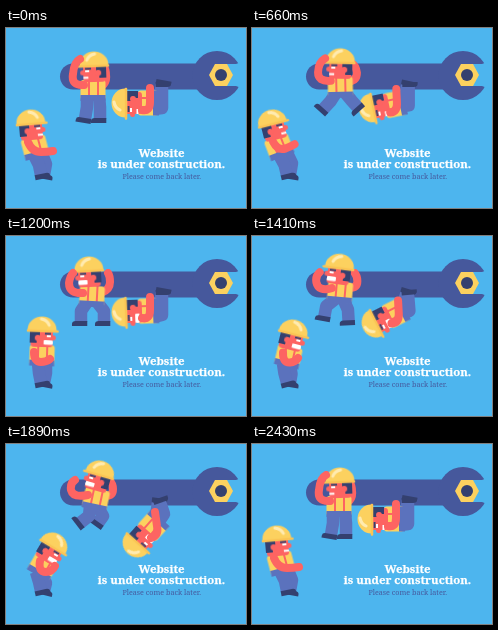
These frames come from a looping animation (240 by 180 pixels, 2.7 s). An HTML page:

```html
<!DOCTYPE html>
<html lang="en">
<head>
<meta charset="utf-8">
<title>Under construction</title>
<style>
html, body { margin: 0; width: 100%; height: 100%; overflow: hidden; background: #4db5ee; }
svg { display: block; width: 100%; height: 100%; }
text { font-family: "Noto Serif", serif; text-anchor: middle; }
.title { font-size: 11.4px; font-weight: 700; fill: #fff; stroke: #fff; stroke-width: .25px; }
.note { font-size: 7.2px; fill: #46589c; }
.leg, .arm { fill: none; stroke-linejoin: round; }
.leg { stroke: #5b72bd; stroke-width: 12.5; marker-end: url(#boot-left); }
.right .leg { marker-end: url(#boot-right); }
.arm { stroke: #fd6462; stroke-width: 8; stroke-linecap: round; }
.move { animation: 2.7s cubic-bezier(.4, 0, .6, 1) infinite; }

/* Hanging worker: two pull-ups */
@keyframes a-head {
  0%, 90%, 100% { transform: translate(88px, 39px) rotate(-2deg); }
  16.67% { transform: translate(88px, 34px) rotate(0deg); }
  35.56% { transform: translate(89px, 39px) rotate(3deg); animation-timing-function: ease-in; }
  44.44% { transform: translate(83px, 36px) rotate(-3deg); animation-timing-function: ease-out; }
  60% { transform: translate(89px, 32px) rotate(12deg); }
  70% { transform: translate(93px, 32px) rotate(16deg); }
}
@keyframes a-body {
  0%, 90%, 100% { transform: translate(87px, 62px); }
  16.67% { transform: translate(88px, 57px) rotate(-2deg); }
  35.56% { transform: translate(89px, 62px); animation-timing-function: ease-in; }
  44.44% { transform: translate(86px, 60px) rotate(3deg); animation-timing-function: ease-out; }
  60% { transform: translate(89px, 54px) rotate(6deg); }
  70% { transform: translate(90px, 55px) rotate(12deg); }
}
@keyframes a-left {
  0%, 90%, 100% { d: path("M81 68L81 79L79 91"); }
  16.67% { d: path("M84 64L76 70L65 76"); }
  35.56% { d: path("M83 68L83 79L82 91"); animation-timing-function: ease-in; }
  44.44% { d: path("M81 66L75 75L75 86"); animation-timing-function: ease-out; }
  60% { d: path("M85 61L74 68L71 79"); }
  70% { d: path("M84 62L83 72L74 79"); }
}
@keyframes a-right {
  0%, 90%, 100% { d: path("M93 68L94 79L94 91"); }
  16.67% { d: path("M93 64L101 69L110 73"); }
  35.56% { d: path("M95 68L97 79L98 91"); animation-timing-function: ease-in; }
  44.44% { d: path("M91 66L98 75L98 86"); animation-timing-function: ease-out; }
  60% { d: path("M91 61L95 73L96 85"); }
  70% { d: path("M92 63L97 72L92 79"); }
}
@keyframes a-near {
  0%, 90%, 100% { d: path("M78 57Q65 58 67 46Q68 34 74 31"); }
  16.67% { d: path("M78 51Q65 52 65 43Q65 34 72 30"); }
  35.56% { d: path("M80 56Q67 57 68 46Q69 35 75 31"); animation-timing-function: ease-in; }
  44.44% { d: path("M77 57Q63 58 63 47Q64 40 67 37"); animation-timing-function: ease-out; }
  60% { d: path("M81 50Q68 55 65 46Q63 40 68 36"); }
  70% { d: path("M82 51Q67 54 65 46Q64 39 69 36"); }
}
@keyframes a-far {
  0%, 90%, 100% { d: path("M96 58Q101 54 100 47Q100 42 98 39"); }
  16.67% { d: path("M97 51Q106 51 106 43Q105 35 100 33"); }
  35.56% { d: path("M97 58Q103 55 103 48Q102 42 99 39"); animation-timing-function: ease-in; }
  44.44% { d: path("M95 57Q104 54 104 46Q104 40 102 37"); animation-timing-function: ease-out; }
  60% { d: path("M98 50Q106 51 106 45Q106 40 103 37"); }
  70% { d: path("M99 52Q107 52 107 45Q107 40 104 37"); }
}

/* Swinging worker: hooked on the handle */
@keyframes b-head {
  0%, 90%, 100% { transform: translate(121px, 75px) rotate(-90deg); }
  16.67% { transform: translate(123px, 82px) rotate(-108deg); }
  35.56% { transform: translate(121px, 75px) rotate(-90deg); animation-timing-function: ease-in; }
  44.44% { transform: translate(121px, 76px) rotate(-92deg); animation-timing-function: ease-out; }
  60% { transform: translate(127px, 91px) rotate(-128deg); }
  70% { transform: translate(132px, 98px) rotate(-138deg); }
}
@keyframes b-body {
  0%, 90%, 100% { transform: translate(142px, 75px) rotate(-90deg); }
  16.67% { transform: translate(143px, 77px) rotate(-108deg); }
  35.56% { transform: translate(142px, 75px) rotate(-90deg); animation-timing-function: ease-in; }
  44.44% { transform: translate(142px, 75px) rotate(-92deg); animation-timing-function: ease-out; }
  60% { transform: translate(144px, 78px) rotate(-128deg); }
  70% { transform: translate(147px, 82px) rotate(-138deg); }
}
@keyframes b-left {
  0%, 90%, 100% { d: path("M148 81L156 80L156 58"); }
  16.67% { d: path("M151 77L157 76L157 58"); }
  35.56% { d: path("M148 81L156 80L156 58"); animation-timing-function: ease-in; }
  44.44% { d: path("M148 81L156 79L156 58"); animation-timing-function: ease-out; }
  60% { d: path("M152 76L158 73L156 58"); }
  70% { d: path("M154 76L158 70L154 58"); }
}
@keyframes b-right {
  0%, 90%, 100% { d: path("M148 70L154 67L156 56"); }
  16.67% { d: path("M148 69L153 65L155 57"); }
  35.56% { d: path("M148 70L154 67L156 56"); animation-timing-function: ease-in; }
  44.44% { d: path("M148 70L154 67L156 56"); animation-timing-function: ease-out; }
  60% { d: path("M148 70L151 65L154 57"); }
  70% { d: path("M150 72L151 66L152 58"); }
}
@keyframes b-arm {
  0%, 90%, 100% { d: path("M136 82Q144 84 144 74L144 60"); }
  16.67% { d: path("M140 86Q147 84 146 74L145 61"); }
  35.56% { d: path("M135 82Q143 84 143 74L143 61"); animation-timing-function: ease-in; }
  44.44% { d: path("M136 82Q144 84 144 74L144 61"); animation-timing-function: ease-out; }
  60% { d: path("M141 90Q149 88 148 78L147 66"); }
  70% { d: path("M145 94Q153 91 151 82L149 68"); }
}

/* Standing worker: leans back, then forward, feet planted */
@keyframes c-head {
  0%, 21%, 80%, 100% { transform: translate(25px, 97px) rotate(-5deg); }
  28.89% { transform: translate(15px, 97px) rotate(-28deg); }
  35.56% { transform: translate(20px, 96px) rotate(-22deg); }
  44.44% { transform: translate(36px, 96px) rotate(2deg); }
  60% { transform: translate(45px, 102px) rotate(26deg); }
  70% { transform: translate(46px, 104px) rotate(31deg); }
}
@keyframes c-body {
  0%, 21%, 80%, 100% { transform: translate(29px, 119px) rotate(-15deg); }
  28.89% { transform: translate(24px, 118px) rotate(-30deg); }
  35.56% { transform: translate(28px, 118px) rotate(-26deg); }
  44.44% { transform: translate(36px, 119px) rotate(2deg); }
  60% { transform: translate(37px, 121px) rotate(24deg); }
  70% { transform: translate(37px, 122px) rotate(30deg); }
}
@keyframes c-left {
  0%, 21%, 80%, 100% { d: path("M28 127L33 137L35 147"); }
  28.89% { d: path("M26 127L32 137L35 147"); }
  35.56% { d: path("M29 127L34 137L35 147"); }
  44.44% { d: path("M32 127L33 137L35 147"); }
  60% { d: path("M30 128L32 138L35 147"); }
  70% { d: path("M30 128L33 138L35 147"); }
}
@keyframes c-right {
  0%, 21%, 80%, 100% { d: path("M36 126L40 136L38 147"); }
  28.89% { d: path("M34 124L40 134L38 147"); }
  35.56% { d: path("M37 125L41 135L38 147"); }
  44.44% { d: path("M40 127L40 137L38 147"); }
  60% { d: path("M36 130L39 139L38 147"); }
  70% { d: path("M36 131L40 139L38 147"); }
}
@keyframes c-arm {
  0%, 21%, 80%, 100% { d: path("M22 114Q26 124 35 124Q41 124 47 123"); }
  28.89% { d: path("M20 114Q26 122 32 115Q35 110 36 106"); }
  35.56% { d: path("M23 115Q30 122 36 116Q39 112 41 106"); }
  44.44% { d: path("M28 116Q28 126 35 126Q40 126 44 123"); }
  60% { d: path("M34 117Q33 128 41 127Q46 126 48 121"); }
  70% { d: path("M34 117Q32 128 40 128Q46 128 49 122"); }
}
@keyframes grit { 0%, 41.9%, 80%, 100% { opacity: 0; } 42%, 79.9% { opacity: 1; } }
.grit { animation: grit 2.7s step-end infinite; }
</style>
</head>
<body>
<svg viewBox="0 0 240 180">
  <defs>
    <g id="boot" fill="#34406f">
      <path d="M-1-6.3H4V9H2Q-1 9-1 5Z"/>
    </g>
    <marker id="boot-left" orient="auto" markerUnits="userSpaceOnUse" markerWidth="24" markerHeight="24" overflow="visible">
      <use href="#boot"/>
    </marker>
    <marker id="boot-right" orient="auto" markerUnits="userSpaceOnUse" markerWidth="24" markerHeight="24" overflow="visible">
      <use href="#boot" transform="scale(1 -1)"/>
    </marker>
    <g id="head">
      <rect x="-11" y="-4" width="22" height="19" rx="3" fill="#fd6462"/>
      <path d="M-12-2H-2V6H-5V11H-12Z" fill="#34406f"/>
      <circle cx="-4" cy="6" r="3" fill="#fd6462"/>
      <rect x="9" y="3" width="5" height="5" rx="2.5" fill="#fd6462"/>
      <path d="M3 1.5H9" stroke="#34406f" stroke-width="2"/>
      <path d="M5 4H9" stroke="#fff" stroke-width="2"/>
      <path d="M6 10.5H11" stroke="#fff" stroke-width="2"/>
      <path d="M-14.5 0V-2A14.5 13.5 0 0 1 14.5-2V0Z" fill="#fcd15f"/>
      <path d="M-14-1H15.5" stroke="#fac454" stroke-width="2.6" stroke-linecap="round"/>
      <path d="M-1-13Q5-12 7-7" fill="none" stroke="#ffebb0" stroke-width="3" stroke-linecap="round"/>
    </g>
    <rect id="teeth" x="2" y="8" width="9" height="4.5" rx="1" fill="#fff"/>
    <g id="body">
      <rect x="-12.5" y="-10" width="25" height="20" rx="3" fill="#fcd15f"/>
      <path d="M-4-10V7M5-10V7" stroke="#fd6462" stroke-width="2"/>
      <path d="M-12.5 5H12.5V11H-12.5Z" fill="#5b72bd"/>
    </g>
  </defs>

  <g fill="#46589c">
    <rect x="54" y="35.5" width="150" height="26" rx="13"/>
    <circle cx="211" cy="47.5" r="24.5"/>
    <path d="M238 33L230 36H220V58H230L238 61Z" fill="#4db5ee"/>
    <path d="M209 36H221L227 47L221 58H209L203 47Z" fill="#fcd15f"/>
    <circle cx="215" cy="47" r="6" fill="#34406f"/>
  </g>

  <text class="title" x="155.5" y="128.5">Website</text>
  <text class="title" x="155.5" y="139.5">is under construction.</text>
  <text class="note" x="155.7" y="151">Please come back later.</text>

  <g>
    <path class="leg move" style="animation-name:b-right"/>
    <path class="leg move" style="animation-name:b-left"/>
    <g class="move" style="animation-name:b-body"><use href="#body"/></g>
    <g class="move" style="animation-name:b-head"><g transform="scale(-1 1)">
      <use href="#head"/><use href="#teeth" class="grit"/>
    </g></g>
    <path class="arm move" style="animation-name:b-arm"/>
  </g>

  <g>
    <path class="arm move" style="animation-name:a-far"/>
    <path class="leg move" style="animation-name:a-right"/>
    <path class="leg move" style="animation-name:a-left"/>
    <g class="move" style="animation-name:a-body"><use href="#body"/></g>
    <g class="move" style="animation-name:a-head"><g transform="scale(-1 1)">
      <use href="#head"/><use href="#teeth" class="grit"/>
    </g></g>
    <path class="arm move" style="animation-name:a-near"/>
  </g>

  <g class="right">
    <path class="leg move" style="animation-name:c-right"/>
    <path class="leg move" style="animation-name:c-left"/>
    <g class="move" style="animation-name:c-body"><use href="#body"/></g>
    <g class="move" style="animation-name:c-head"><use href="#head"/><use href="#teeth" class="grit"/></g>
    <path class="arm move" style="animation-name:c-arm"/>
  </g>
</svg>
</body>
</html>
```
